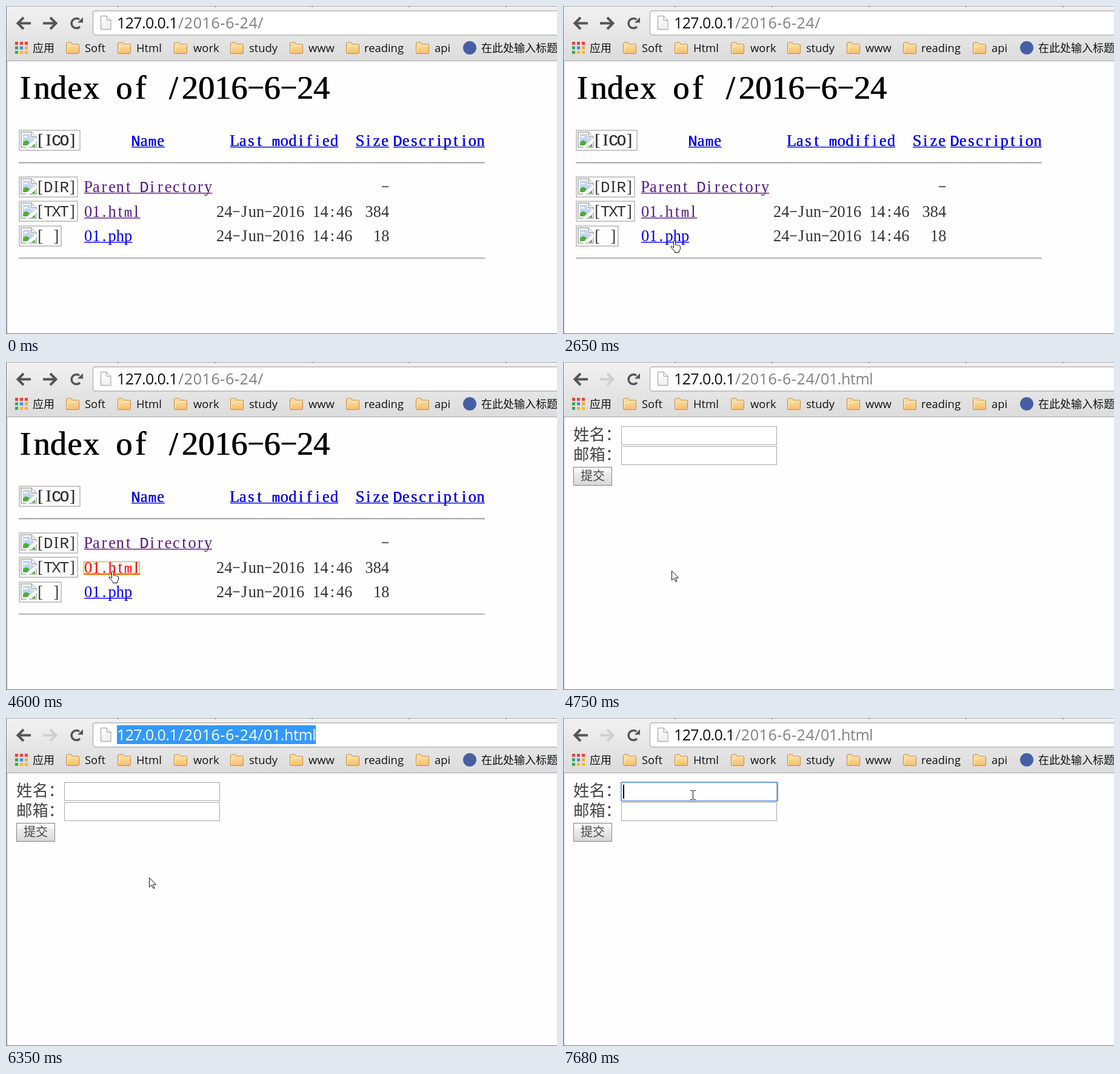
Recreate the animation shown at these times as an HTML page with a canvas. Size 909 by 541 pixels, loop 8 s.

```html
<!DOCTYPE html>
<html lang="zh">
<head>
<meta charset="utf-8">
<title>Directory index and form</title>
<style>
  html, body { margin: 0; width: 100%; height: 100%; overflow: hidden; }
  canvas { display: block; }
</style>
</head>
<body>
<canvas id="stage" width="909" height="541"></canvas>
<script>
const ctx = document.getElementById('stage').getContext('2d');
const LOOP = 8000;
const UI = '"Open Sans", "Noto Sans CJK SC", "Noto Sans CJK", sans-serif';
const CJK = '"Noto Sans CJK SC", "Noto Sans CJK", sans-serif';
const SERIF = '"Liberation Serif", serif';
const MONO = '"Liberation Mono", monospace';
const BLUE = '#0000ee', VISITED = '#551a8b', INK = '#333';

// Pointer stops: time, x, y, shape (a arrow, h hand, i text beam)
const STOPS = [
  [500, 52, 457, 'a'], [620, 110, 350, 'a'], [750, 160, 250, 'a'], [870, 182, 165, 'a'],
  [1010, 230, 215, 'a'], [1130, 274, 265, 'a'], [1280, 291, 320, 'a'], [1400, 302, 365, 'a'],
  [1550, 250, 407, 'a'], [1680, 199, 401, 'a'], [1830, 181, 393, 'h'], [1950, 177, 389, 'h'],
  [2100, 177, 386, 'h'], [2250, 177, 383, 'h'], [2650, 177, 386, 'h'], [2770, 181, 388, 'h'],
  [2900, 187, 390, 'h'], [3020, 194, 392, 'h'], [3140, 200, 393, 'h'], [3290, 227, 370, 'a'],
  [3410, 184, 344, 'h'], [3560, 177, 344, 'h'], [3690, 180, 342, 'h'], [3840, 174, 341, 'h'],
  [3960, 168, 344, 'h'], [4210, 169, 344, 'h'], [4750, 179, 344, 'a'], [4870, 187, 352, 'a'],
  [5020, 221, 332, 'a'], [5140, 215, 323, 'a'], [5290, 399, 28, 'i'], [5440, 470, 24, 'i'],
  [5570, 532, 20, 'i'], [5720, 410, 19, 'i'], [5840, 277, 19, 'i'], [5990, 150, 20, 'i'],
  [6110, 185, 120, 'a'], [6230, 215, 210, 'a'], [6350, 236, 263, 'a'], [6500, 226, 200, 'a'],
  [6620, 200, 128, 'i'], [6740, 192, 119, 'i'], [6890, 201, 119, 'i'], [7020, 210, 119, 'i']
];

function rect(x, y, w, h, fill) {
  ctx.fillStyle = fill;
  ctx.fillRect(x, y, w, h);
}

function frame(x, y, w, h, color, width = 1) {
  ctx.strokeStyle = color;
  ctx.lineWidth = width;
  ctx.strokeRect(x + width / 2, y + width / 2, w - width, h - width);
}

function shape(x, y, d, fill, stroke, width = 1) {
  const path = new Path2D(d);
  ctx.save();
  ctx.translate(x, y);
  if (fill) { ctx.fillStyle = fill; ctx.fill(path); }
  if (stroke) { ctx.strokeStyle = stroke; ctx.lineWidth = width; ctx.stroke(path); }
  ctx.restore();
}

function vertical(y0, y1, ...colors) {
  const g = ctx.createLinearGradient(0, y0, 0, y1);
  colors.forEach((c, i) => g.addColorStop(i / (colors.length - 1), c));
  return g;
}

function text(str, x, y, size, color, family = UI, spacing = 0) {
  ctx.font = `${size}px ${family}`;
  ctx.letterSpacing = spacing + 'px';
  ctx.textAlign = 'left';
  ctx.fillStyle = color;
  ctx.fillText(str, x, y);
}

// Half-width serif: every character is centred in a fixed cell, hyphens are long bars
function cells(str, x, y, color = INK, cell = 13.2, size = 26.4, bold = 0) {
  ctx.letterSpacing = '0px';
  ctx.textAlign = 'center';
  ctx.fillStyle = color;
  [...str].forEach((ch, i) => {
    const cx = x + (i + 0.5) * cell;
    if (ch === '-') {
      ctx.fillRect(cx - cell * 0.42, y - size * 0.37, cell * 0.84 + bold, size * 0.06);
      return;
    }
    const scale = /[mw]/.test(ch) ? 0.85 : 0.98;
    ctx.font = /[A-HKM-OQRT-Zmw]/.test(ch) ? `${size * scale}px ${MONO}` : `${size}px ${SERIF}`;
    ctx.fillText(ch, cx, y);
    if (bold) ctx.fillText(ch, cx + bold, y);
  });
}

function link(str, x, y, color, bold) {
  const cell = bold ? 13.7 : 13.2;
  cells(str, x, y, color, cell, 26.4, bold);
  rect(x, y + 1, str.length * cell, 1.4, color);
}

function brokenImage(alt, y, w, bold) {
  frame(21, y, w, 35, '#c6c6c6', 2);
  shape(24, y + 3, 'M1 1H18L26 9V26H1Z', '#fff', '#a5a5a5', 1.4);
  shape(24, y + 3, 'M4 4H16V11H23V14L11 23H4Z', '#c3d5f3');
  shape(24, y + 3, 'M4 23V18Q9 11 15 18L11 23Z', '#4caf3c');
  shape(24, y + 3, 'M5 10Q5 7 8 8Q11 6 12 10Z', '#fff');
  shape(24, y + 3, 'M18 1V9H26', '#eee', '#a5a5a5', 1.4);
  shape(24, y + 3, 'M10 27L27 13', null, '#fff', 4);
  shape(24, y + 3, 'M18 25H24V20Z', '#4caf3c');
  cells(alt, 50, y + 26, INK, 13.2, 26.4, bold);
}

function rule(y) {
  rect(21, y, 769, 1.5, '#999');
  rect(21, y + 1.5, 769, 1, '#ddd');
}

function folder(x, label, labelX) {
  shape(x, 59, 'M.5 18V3Q.5 1 2.5 1H8.5L10.5 4H20Q21.5 4 21.5 6V18Q21.5 19.5 20 19.5H2Q.5 19.5 .5 18Z',
    vertical(0, 20, '#ffe3a6', '#f2bf6f'), '#c08a48');
  shape(x, 59, 'M2 18V8H9L11 6H20', null, '#fff0cc');
  text(label, labelX, 76, 18.4, '#111');
}

function toolbar(t) {
  rect(0, 0, 909, 91, vertical(0, 90, '#f2f2f2', '#e6e6e6', '#dcdcdc'));
  rect(0, 0, 909, 1, '#aaa');
  for (let x = 185; x < 909; x += 160) rect(x - 1, 0, 2, 2, '#999');
  rect(0, 90, 909, 1, '#a6a6a6');

  const back = 'M24 10.5H3M12 1L2.5 10.5L12 20';
  shape(17, 18, back, null, '#555', 4);
  ctx.save();
  ctx.translate(102, 0);
  ctx.scale(-1, 1);
  shape(17, 18, back, null, t < 4750 ? '#555' : '#cfcfcf', 4);
  ctx.restore();
  shape(116, 28.5, 'M6 5.5A8 8 0 1 1 5 -6.2', null, '#555', 3.5);
  shape(116, 28.5, 'M11 -10V-1H2Z', '#555');

  ctx.beginPath();
  ctx.roundRect(143.5, 8, 780, 40, 4);
  ctx.fillStyle = '#fff';
  ctx.fill();
  ctx.strokeStyle = '#b4b4b4';
  ctx.lineWidth = 1.4;
  ctx.stroke();
  shape(156, 16, 'M.5 .5H10L17 7.5V22.5H.5Z', vertical(0, 23, '#fff', '#eee'), '#999');
  shape(156, 16, 'M10 .5V7.5H17', null, '#999');
  address(t);

  const apps = ['#ea4335', '#ea4335', '#ea4335', '#34a853', '#4285f4', '#fbae17', '#34a853', '#fbbc05', '#fbbc05'];
  apps.forEach((c, i) => rect(15 + i % 3 * 8, 59 + Math.floor(i / 3) * 7.5, 5, 5, c));
  text('应用', 44, 76, 18, '#111', CJK);
  folder(99, 'Soft', 130);
  folder(184, 'Html', 215);
  folder(277, 'work', 309);
  folder(370, 'study', 401);
  folder(468, 'www', 499);
  folder(561, 'reading', 591);
  folder(676, 'api', 707);
  ctx.beginPath();
  ctx.arc(765, 69, 11, 0, 7);
  ctx.fillStyle = '#465fa3';
  ctx.fill();
  text('在此处输入标题', 784, 76, 18, '#111', CJK);
}

function url(hostColor, pathColor, file) {
  text('127.0.0.1', 183, 37, 25, hostColor, UI, -0.65);
  text('/2016-6-24/', 284, 37, 25, pathColor, UI, 0.6);
  text(file, 425, 37, 25, pathColor, UI, -0.4);
}

function address(t) {
  const file = t < 4750 ? '' : '01.html';
  url('#111', '#808080', file);
  if (t < 5720 || t >= 6740) return;
  const start = t < 5840 ? 410 : t < 5990 ? 281 : 183;
  ctx.save();
  ctx.beginPath();
  ctx.rect(start, 12, 511 - start, 31);
  ctx.clip();
  rect(start, 12, 511 - start, 31, '#3399ff');
  url('#fff', '#fff', file);
  ctx.restore();
}

function indexPage(t) {
  cells('Index of /2016-6-24', 18, 153, '#000', 27.15, 54, 1);
  brokenImage('[ICO]', 204, 102, 0.5);
  link('Name', 207, 231, BLUE, 0.4);
  link('Last modified', 370, 231, BLUE, 0.4);
  link('Size', 577, 231, BLUE, 0.4);
  link('Description', 639, 231, BLUE, 0.4);
  rule(257.5);
  brokenImage('[DIR]', 281, 98);
  brokenImage('[TXT]', 321, 98);
  brokenImage('[ ]', 362, 71);
  const pressed = t >= 4600;
  link('Parent Directory', 129, 307, VISITED);
  link('01.html', 129, 348, pressed ? '#f00' : VISITED);
  link('01.php', 129, 388, BLUE);
  if (pressed) frame(128, 329, 93, 22, '#e59700');
  cells('-', 619, 307);
  for (const y of [348, 388]) cells('24-Jun-2016 14:46', 347, y);
  cells('384', 592.5, 348);
  cells('18', 606, 388);
  rule(415);
}

function formPage(t) {
  const label = '300 26.4';
  text('姓名：', 17, 129, label, '#444', CJK);
  text('邮箱：', 17, 162, label, '#444', CJK);
  for (const y of [106, 139]) {
    rect(96, y, 257, 31, '#fff');
    frame(96, y, 257, 31, '#a9a9a9');
  }
  rect(17, 173, 64, 31, vertical(173, 204, '#f4f4f4', '#e8e8e8', '#d6d6d6'));
  rect(19, 175, 60, 7, '#f8f8f8');
  frame(17, 173, 64, 31, '#858585');
  text('提交', 29, 195, '300 20', '#444', CJK);

  if (t < 6740) return;
  ctx.beginPath();
  ctx.roundRect(96, 106, 258, 31, 1.5);
  ctx.strokeStyle = '#6b9be0';
  ctx.lineWidth = 2;
  ctx.stroke();
  if (t < 7290) rect(99, 110, 2, 23, '#000');
  else if (t >= 7540) rect(t < 7680 ? 109 : 99, 110, 2, 23, '#000');
}

const POINTERS = {
  a: 'M.5 .5V16L4.2 12.5L6.8 18H9L6.7 11.8H11.5Z',
  h: 'M5.5 13V2Q7 -.5 8.5 2V8Q10 7 11.3 8.5Q12.8 7.5 13.8 9.2Q16.5 8.5 16.5 11V15L14.5 18V20.5H7.5V18.5L1 12Q1 9.5 3 10.5Z',
  i: 'M0 .5H3.5L4.5 1.5L5.5 .5H9M4.5 1V15M0 15.5H3.5L4.5 14.5L5.5 15.5H9'
};

function pointer(t) {
  const stop = STOPS.filter(s => s[0] <= t).pop();
  if (!stop) return;
  const [, x, y, kind] = stop;
  shape(x, y, POINTERS[kind], kind === 'i' ? null : '#fff', '#111');
}

function draw(now) {
  const t = now % LOOP;
  rect(0, 0, 909, 541, '#fefefe');
  toolbar(t);
  (t < 4750 ? indexPage : formPage)(t);
  rect(0, 0, 1, 541, '#777');
  rect(1, 91, 1.5, 449, '#c8c8c8');
  rect(0, 540, 909, 1, '#777');
  pointer(t);
  requestAnimationFrame(draw);
}
requestAnimationFrame(draw);
</script>
</body>
</html>
```
